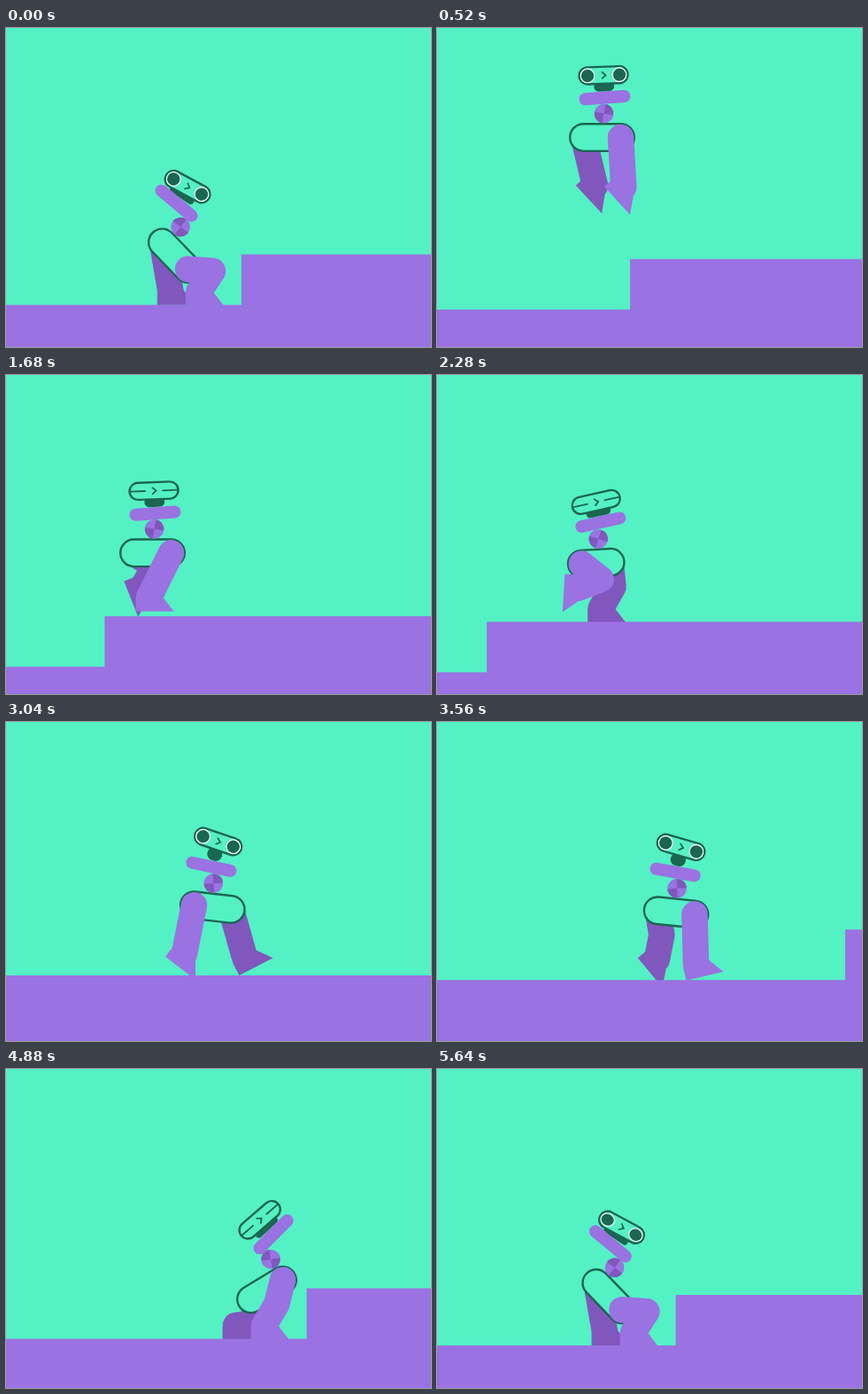
An HTML page that plays this animation: 480 px wide and 360 px high, repeating every 5680 ms.

```html
<!DOCTYPE html>
<html lang="en">
<head>
<meta charset="utf-8">
<title>Stair walker</title>
<style>
  html, body { margin: 0; width: 100%; height: 100%; overflow: hidden; background: #54f1c4; }
  svg { display: block; width: 100vw; height: 100vh; }
  .mint { fill: #54f1c4; }
  .light { fill: #9a72e2; }
  .dark { fill: #8157bd; }
  .ink { fill: #1b6650; }
  .line { stroke: #1b6650; stroke-width: 2.4; stroke-linecap: round; }
  .thin { fill: none; stroke-width: 1.8; }
  .leg path { fill: none; stroke-width: 29.5; stroke-linecap: round; stroke-linejoin: round; }
  .leg.light path { stroke: #9a72e2; }
  .leg.dark path { stroke: #8157bd; }
</style>
</head>
<body>
<svg viewBox="0 0 480 360">
  <defs>
    <clipPath id="eyeClip"><circle r="8.6"/></clipPath>
    <g id="eye">
      <path id="lid" class="line thin" d="M-8 0H8"/>
      <g id="eyeball" clip-path="url(#eyeClip)"><circle r="8.6" fill="#fff"/><circle id="pupil" class="ink"/></g>
    </g>
  </defs>
  <rect class="mint" width="480" height="360"/>
  <g id="darkLeg" class="leg dark"><path/><polygon points="0,.7 43,.7 30,-16 0,-15"/></g>
  <rect id="body" class="mint line" y="-15.3" height="30.6" rx="15.3"/>
  <g id="lightLeg" class="leg light"><path/><polygon points="0,.7 43,.7 30,-16 0,-15"/></g>
  <g id="ball">
    <circle class="light" r="10.8"/>
    <path class="dark" d="M0 0V-10.8A10.8 10.8 0 0 1 10.8 0ZM0 0V10.8A10.8 10.8 0 0 1 -10.8 0Z"/>
  </g>
  <rect id="neck" class="ink"/>
  <rect id="bar" class="light" x="-29" y="-7" width="58" height="14" rx="7"/>
  <g id="head">
    <rect class="mint line" x="-27.5" y="-9.6" width="55" height="19.2" rx="9.6"/>
    <path class="line thin" d="M-1.5 -3.5L2.5 0L-1.5 3.5"/>
    <use href="#eye" x="-18"/>
    <use href="#eye" x="18"/>
  </g>
  <path id="ground" class="light"/>
</svg>
<script>
const LOOP = 5680, PAN = 0.092, RUN = PAN * LOOP, RISE = 57;
const HALF = 21, BONE = 28, PIVOT = 33, RAD = Math.PI / 180;
const STEP = 487.5, SWING = 440, FIRST = 2060, TAKEOFF = 330;

const $ = id => document.getElementById(id);
const clamp = (v, lo, hi) => Math.max(lo, Math.min(hi, v));
const mix = (a, b, u) => a + (b - a) * u;
const smooth = (t, a, b) => { const u = clamp((t - a) / (b - a), 0, 1); return u * u * (3 - 2 * u); };
const softRamp = v => (v + Math.hypot(v, 12)) / 2;
const place = (el, x, y, angle) => el.setAttribute('transform', `translate(${x} ${y}) rotate(${angle})`);
const setAll = (el, attrs) => { for (const key in attrs) el.setAttribute(key, attrs[key]); };

// Crouch and lean come from three gestures, the gait and a ballistic jump.
function poseAt(t) {
  const wind = 1 - smooth(t, 60, 330) + smooth(t, 4950, 5640);
  const land = smooth(t, 550, 1040) * (1 - smooth(t, 1100, 1550));
  const halt = smooth(t, 4350, 4860) * (1 - smooth(t, 4900, 5350));
  const walk = smooth(t, 1700, FIRST) * (1 - smooth(t, 4100, 4400));
  const bounce = walk * Math.cos(2 * Math.PI * (t - FIRST) / STEP);

  const stride = 389 + 0.163 * (t - 2280);
  const x = 191 + 128 * smooth(t, 150, 1100) + softRamp(stride - 319) - softRamp(stride - 744)
    - 30.5 * smooth(t, 4900, 5640);

  const legs = 71.5 - 16 * Math.max(wind, land, halt) + 5.5 * bounce;
  const arc = 222 - 0.0011 * (t - 680) ** 2;
  const height = Math.max(legs + (t < 680 ? 0 : RISE), arc);

  const tilt = 46 * wind - 37 * land - 31 * halt + 1.5 * walk + 5 * bounce;
  const stretch = clamp((legs - 55) / 22, 0, 1) ** 3;
  return {
    x, height, tilt,
    barTilt: 1.1 * tilt - 11 + 16 * stretch,
    headTilt: 0.9 * tilt - 13 + 26 * stretch,
    gap: 22.5 + 7 * stretch
  };
}

// heel positions of each foot, from one staircase crouch to the next
const feet = {
  dark: { spots: [171, 266, 380, 543, 693.6], jumpEnd: 985, firstLand: FIRST },
  light: { spots: [203, 298, 453, 609, 725.6], jumpEnd: 1055, firstLand: FIRST + STEP }
};

function footAt({ spots, jumpEnd, firstLand }, t) {
  let x = spots[0], lift = 0, angle = 0;
  for (let i = 1; i < spots.length; i++) {
    const jump = i === 1;
    const land = jump ? jumpEnd : firstLand + 2 * STEP * (i - 2);
    const off = jump ? TAKEOFF : land - SWING;
    if (t < off - 250) break;
    const u = clamp((t - off) / (land - off), 0, 1), hop = Math.sin(Math.PI * u);
    x = mix(spots[i - 1], spots[i], jump ? u : u ** 2.1);
    lift = jump ? RISE * u + 105 * hop : RISE + 22 * hop;
    if (u === 0) angle = 54 * ((t - off + 250) / 250) ** 2;
    else if (jump) angle = 54 * (1 - u) ** 0.4;
    else if (u < 1) angle = mix(54, 95, smooth(u, 0, 0.35)) - 125 * smooth(u, 0.35, 1);
    else angle = -30 * (1 - clamp((t - land) / 70, 0, 1));
  }
  const a = Math.max(angle, 0) * RAD;
  return { x: x + PIVOT * (1 - Math.cos(a)), lift: lift + PIVOT * Math.sin(a), angle };
}

// signed half distance of the light hip from the middle of the body
function hipSpread(t) {
  let spread = HALF;
  for (let k = 0; k < 6; k++) {
    const land = FIRST + STEP * k;
    spread += (k % 2 ? 2 : -2) * HALF * smooth(t, land - 335, land);
  }
  return spread;
}

function drawLeg(el, hipX, hipY, foot, camX, floor) {
  const c = Math.cos(foot.angle * RAD), s = Math.sin(foot.angle * RAD);
  const toAnkleX = 15 * (c + s), toAnkleY = 15 * (s - c);
  let dx = foot.x - camX + toAnkleX - hipX, dy = floor - foot.lift + toAnkleY - hipY;
  const dist = Math.hypot(dx, dy) || 1, reach = Math.min(dist, 2 * BONE);
  dx *= reach / dist;
  dy *= reach / dist;
  const bend = Math.sqrt(BONE * BONE - reach * reach / 4) / reach;
  const kneeX = hipX + dx / 2 + dy * bend, kneeY = hipY + dy / 2 - dx * bend;
  const ankleX = hipX + dx, ankleY = hipY + dy;
  el.children[0].setAttribute('d', `M${hipX} ${hipY}L${kneeX} ${kneeY}L${ankleX} ${ankleY}`);
  place(el.children[1], ankleX - toAnkleX, ankleY - toAnkleY, foot.angle);
}

// a point resting on a tilted surface, slid along it
function rest(x, y, angle, along, up) {
  const c = Math.cos(angle * RAD), s = Math.sin(angle * RAD);
  return [x + along * c + up * s, y + along * s - up * c];
}

function drawEyes(t) {
  const open = 1 - smooth(t, 860, 960) + smooth(t, 2480, 2600) - smooth(t, 4230, 4330) + smooth(t, 5480, 5680);
  const look = t < 4400 ? smooth(t, 3880, 4030) : 0;
  $('lid').style.display = open < 0.1 ? '' : 'none';
  $('eyeball').style.display = open < 0.1 ? 'none' : '';
  $('eyeball').setAttribute('transform', `scale(1 ${open})`);
  setAll($('pupil'), { cx: 12 * look, r: 7.2 + 4.8 * look });
}

function draw(t) {
  const camX = PAN * t, floor = 312.5 + RISE * t / LOOP;
  const pose = poseAt(t), { tilt, barTilt, headTilt, gap } = pose;
  const x = pose.x - camX, y = floor - pose.height;
  const spread = hipSpread(t), wide = Math.abs(spread) + 15.3;
  const hipX = spread * Math.cos(tilt * RAD), hipY = spread * Math.sin(tilt * RAD);

  drawLeg($('darkLeg'), x - hipX, y - hipY, footAt(feet.dark, t), camX, floor);
  drawLeg($('lightLeg'), x + hipX, y + hipY, footAt(feet.light, t), camX, floor);
  setAll($('body'), { x: -wide, width: 2 * wide });
  place($('body'), x, y, tilt);

  // the ball rolls on the body, the bar rolls on the ball
  const roll = 2 + clamp(-36 * tilt * RAD, -21, 20);
  const [ballX, ballY] = rest(x, y, tilt, roll, 27);
  place($('ball'), ballX, ballY, tilt + roll / 11 / RAD);

  const slide = clamp(-30 * barTilt * RAD, -22, 22);
  const [barX, barY] = rest(ballX, ballY, barTilt, slide, 17.7);
  place($('bar'), barX, barY, barTilt);

  const mid = (barTilt + headTilt) / 2;
  const [headX, headY] = rest(barX, barY, mid, 0, gap);
  place($('head'), headX, headY, headTilt);

  // the neck keeps its area while it is squeezed
  const thick = gap - 14.5, long = clamp(250 / thick, 17, 32);
  setAll($('neck'), { x: -long / 2, y: -thick / 2, width: long, height: thick, rx: thick / 2 });
  place($('neck'), (barX + headX) / 2, (barY + headY) / 2, mid);

  drawEyes(t);
  const edge = 266 - camX;
  $('ground').setAttribute('d',
    `M-400 ${floor}H${edge}v${-RISE}H${edge + RUN}v${-RISE}H1100V400H-400Z`);
}

const start = performance.now();
function frame() {
  draw((performance.now() - start) % LOOP);
  requestAnimationFrame(frame);
}
frame();
</script>
</body>
</html>
```
